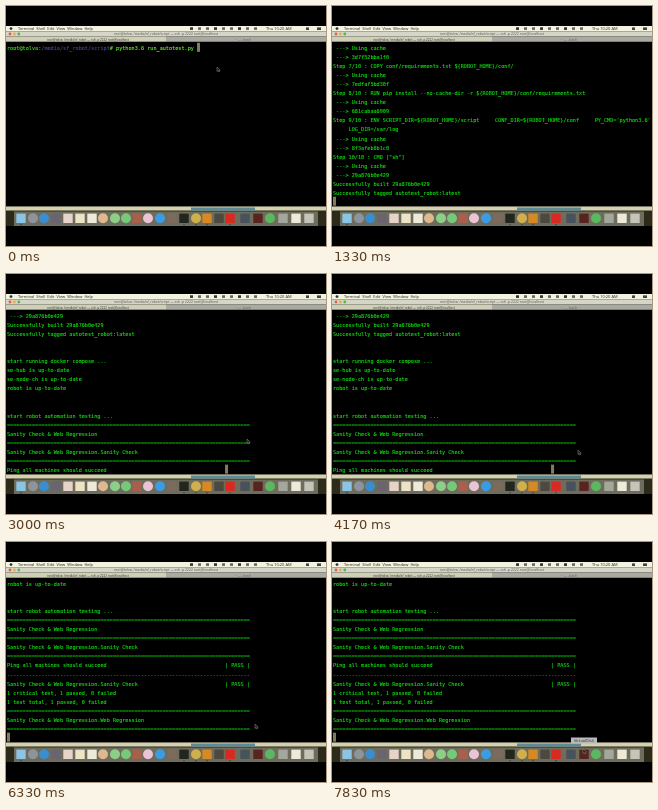
An HTML page with a canvas that plays this animation: 320x240 px, repeating every 8000 ms.

```html
<!DOCTYPE html>
<html lang="en">
<head>
<meta charset="utf-8">
<title>Automated test run</title>
<style>
  html, body { margin: 0; width: 100%; height: 100%; overflow: hidden; background: #000; }
  canvas { display: block; width: 100vw; height: 100vh; }
</style>
</head>
<body>
<canvas id="stage" width="320" height="240"></canvas>
<script>
const ctx = document.getElementById('stage').getContext('2d');
const LOOP = 8000, TICK = 1000 / 6;
const COL = 3.115, ROW = 9.05, TOP = 42.2, ROWS = 18;
const GREEN = '#0fe00f', CURSOR = '#827c5c';
const MONO = '"DejaVu Sans Mono", monospace', SANS = '"Open Sans", sans-serif';

const prompt = [['root@tolva', '#3ce41c'], [':', '#888'], ['/media/sf_robot/script', '#4a4484'],
  ['# python3.6 run_autotest.py ', '#6cec2c']];

const rule = ch => ch.repeat(78);
const step = (n, command, id) => [`Step ${n}/10 : ${command}`, ' ---> Using cache', ` ---> ${id}`];
const passed = name => name.padEnd(70) + '| PASS |';
const suite = 'Sanity Check & Web Regression';
const ping = 'Ping all machines should succeed';

// Each batch of output appears at once at its time.
const batches = [
  [830, ['', '', 'start building docker image ...',
    'Sending build context to Docker daemon  38.4kB']],
  [1000, [
    'Step 1/10 : FROM python:3.6', ' ---> 5c1e0b7a92d4',
    ...step(2, 'RUN apt-get update', '0b94d7e1a6c3'),
    ...step(3, 'ENV ROBOT_HOME=/opt/robot', 'c27e15fa8b90')]],
  [1170, [
    ...step(4, 'RUN mkdir -p ${ROBOT_HOME}/conf', '94ad03be71f2'),
    ...step(5, 'RUN mkdir -p ${ROBOT_HOME}/script', 'e8072cd5b1a6'),
    ...step(6, 'WORKDIR ${ROBOT_HOME}', '3d7f52bba1f0')]],
  [1330, [
    ...step(7, 'COPY conf/requirements.txt ${ROBOT_HOME}/conf/', '7edfaf5bd30f'),
    ...step(8, 'RUN pip install --no-cache-dir -r ${ROBOT_HOME}/conf/requirements.txt', '681cabaa6909'),
    "Step 9/10 : ENV SCRIPT_DIR=${ROBOT_HOME}/script     CONF_DIR=${ROBOT_HOME}/conf     PY_CMD='python3.6'",
    '     LOG_DIR=/var/log', ' ---> Using cache', ' ---> 8f3afeb8b1c0',
    ...step(10, 'CMD ["sh"]', '29a876b0e429'),
    'Successfully built 29a876b0e429', 'Successfully tagged autotest_robot:latest']],
  [1500, ['', '', 'start running docker compose ...']],
  [1670, ['se-hub is up-to-date', 'se-node-ch is up-to-date', 'robot is up-to-date']],
  [1830, ['', '', 'start robot automation testing ...']],
  [2500, [rule('='), suite, rule('='), suite + '.Sanity Check', rule('='), ping]],
  [6170, [rule('-'), passed(suite + '.Sanity Check'),
    '1 critical test, 1 passed, 0 failed', '1 test total, 1 passed, 0 failed',
    rule('='), suite + '.Web Regression', rule('=')]]
];

const pointerPath = [[0, 211, 61], [1830, 213, 62.5], [3000, 241, 165],
  [4170, 246, 176], [4500, 249, 182], [7000, 249, 182], [7670, 251, 207], [8000, 251, 207]];

function box(x, y, w, h, color) {
  ctx.fillStyle = color;
  ctx.fillRect(x, y, w, h);
}

function disc(x, y, r, color) {
  ctx.fillStyle = color;
  ctx.beginPath();
  ctx.arc(x, y, r, 0, Math.PI * 2);
  ctx.fill();
}

// Laid out at ten times the size so that small advances keep their fractions.
function text(s, x, y, size, color, family = SANS, align = 'left') {
  ctx.save();
  ctx.translate(x, y);
  ctx.scale(0.1, 0.1);
  ctx.font = `${size * 10}px ${family}`;
  ctx.textAlign = align;
  ctx.fillStyle = ctx.strokeStyle = color;
  ctx.fillText(s, 0, 0);
  if (family === MONO) {
    ctx.lineWidth = 1.2;
    ctx.lineJoin = 'round';
    ctx.strokeText(s, 0, 0);
  }
  ctx.restore();
}

const rowY = row => TOP + row * ROW;
const mono = (s, col, row, color = GREEN) =>
  text(s, 1 + col * COL, rowY(row) + 1.8, COL / 0.602, color, MONO);

function drawTerminal(t) {
  const lines = [prompt];
  for (const [time, output] of batches) if (t >= time) lines.push(...output);

  let cursorCol = 0;
  if (t < 830) cursorCol = 61;
  else if (t >= 2500 && t < 6170) cursorCol = 70;
  else lines.push('');
  if (t >= 6170) lines[lines.indexOf(ping)] = passed(ping);

  const shown = lines.slice(-ROWS);
  shown.forEach((line, row) => {
    if (typeof line === 'string') return mono(line, 0, row);
    let col = 0;
    for (const [part, color] of line) {
      mono(part, col, row, color);
      col += part.length;
    }
  });
  box(1 + cursorCol * COL, rowY(shown.length - 1) - 5.4, 3, 9, CURSOR);
}

function drawWindowBars() {
  box(0, 20, 320, 5.5, '#f2f2de');
  disc(5, 22.6, 1.4, '#333');
  text('Terminal  Shell  Edit  View  Window  Help', 12, 24.3, 4, '#222');
  for (let i = 0; i < 9; i++) box(184 + i * 8, 21.3, 3, 2.6, i % 3 ? '#666' : '#333');
  text('Thu 10:20 AM', 260, 24.3, 4, '#222');
  box(300, 21.4, 3, 2.6, '#444');
  box(311, 21.4, 4, 2.6, '#444');

  box(0, 25.5, 320, 5, '#d6d6c8');
  ['#e8584e', '#e5b33c', '#52b848'].forEach((c, i) => disc(4 + i * 4.4, 28, 1.4, c));
  text('root@tolva: /media/sf_robot/script — ssh -p 2222 root@localhost', 160, 29.4, 3.45, '#555', SANS, 'center');

  box(0, 30.5, 160, 5.3, '#cfcfb8');
  box(160, 30.5, 160, 5.3, '#aaaaa0');
  box(0, 35.5, 320, 0.5, '#777');
  text('root@tolva: /media/sf_robot — ssh -p 2222 root@localhost', 82, 34.6, 3, '#333', SANS, 'center');
  text('~ — -bash', 237, 34.6, 3.5, '#666', SANS, 'center');
}

const dockIcons = [
  [15, '#8cc4e4'], [27, '#8d949c', 1], [38, '#3a8ed0', 1], [50, '#6a6470'],
  [62, '#e6d4c8'], [74, '#ece4c4'], [86, '#eeeada'], [97, '#e0b890', 1],
  [109, '#8cd088', 1], [120, '#78c87a', 1], [131, '#a8604c'], [142, '#e8c4d4', 1],
  [154, '#3b9ce4', 1], [166, '#7c6a5c'], [178, '#22261c'], [190, '#d0b04c', 1],
  [201, '#d68a26'], [213, '#4c4a40'], [224, '#d92a22'], [239, '#48525c'],
  [252, '#58241f'], [264, '#5cb860', 1], [277, '#a4a89c'], [290, '#eeeada'], [303, '#c4c4b8']
];

function drawDock(t) {
  box(0, 200.5, 320, 19.5, '#2c2a18');
  box(0, 200.5, 320, 4, '#d4d0b2');
  box(185, 201.5, 64, 3, '#5c8a96');
  box(8, 205.5, 304, 14.5, '#6e6c5c');
  for (const [x, color, round] of dockIcons) {
    if (round) disc(x, 212.3, 5, color);
    else box(x - 4.7, 207.6, 9.4, 9.4, color);
  }
  for (const x of [15, 178, 190, 201, 224]) disc(x, 218.8, 0.6, '#222');
  if (t >= 7500) {
    box(239, 195.5, 26, 6, '#b9b9b9');
    text('VirtualDisk', 252, 200, 4, '#333', SANS, 'center');
  }
}

function drawPointer(t) {
  if (t >= 830 && t < 1670) return; // hidden after the key press
  const i = pointerPath.findIndex(p => p[0] > t);
  const [t0, x0, y0] = pointerPath[i - 1], [t1, x1, y1] = pointerPath[i];
  const k = (t - t0) / (t1 - t0);
  ctx.save();
  ctx.translate(x0 + (x1 - x0) * k, y0 + (y1 - y0) * k);
  ctx.beginPath();
  [[0, 0], [0, 4.4], [1.1, 3.5], [1.9, 5], [2.6, 4.6], [1.9, 3.2], [3.2, 3.1]]
    .forEach(([x, y]) => ctx.lineTo(x, y));
  ctx.closePath();
  ctx.fillStyle = '#111';
  ctx.strokeStyle = '#808080';
  ctx.lineWidth = 0.6;
  ctx.fill();
  ctx.stroke();
  ctx.restore();
}

function draw(now) {
  const raw = now % LOOP;
  const t = Math.min(LOOP - 1, Math.ceil(Math.floor((raw + 4) / TICK) * TICK / 10) * 10);
  box(0, 0, 320, 240, '#000');
  drawTerminal(t);
  drawWindowBars();
  drawDock(t);
  drawPointer(t);
}

const start = performance.now();
function frame() {
  draw(performance.now() - start);
  requestAnimationFrame(frame);
}
frame();
</script>
</body>
</html>
```
